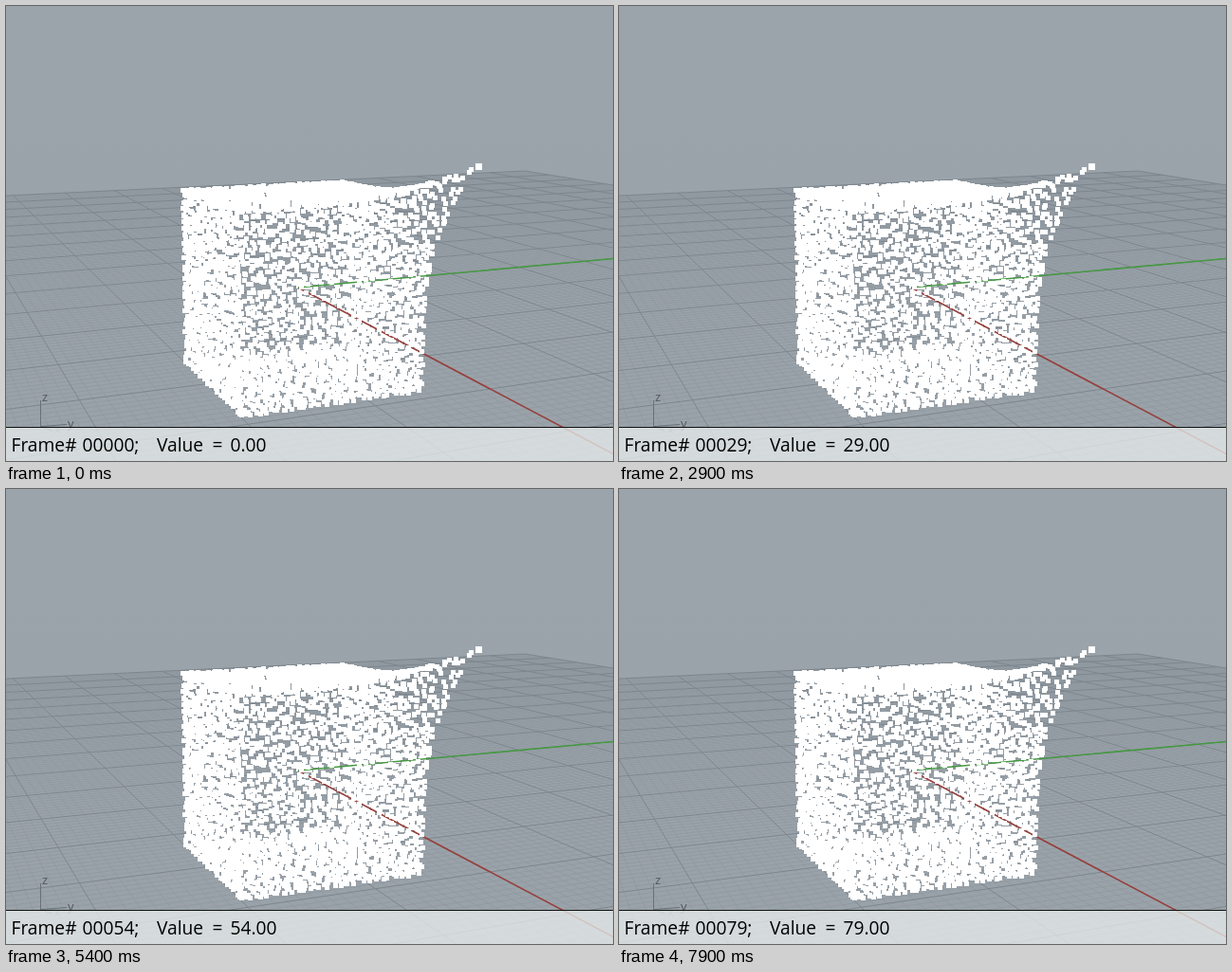
Write an HTML page that moves like this. It is 640 px wide and 480 px high and loops after 8000 ms.

```html
<!DOCTYPE html>
<html lang="en">
<head>
<meta charset="utf-8">
<style>
html, body { margin: 0; width: 100%; height: 100%; overflow: hidden; background: #9da4ab; }
svg { display: block; }
text { font: 19.2px "Open Sans", "Noto Sans", sans-serif; fill: #000; white-space: pre; }
.icon { font-size: 13px; fill: #51585e; }
</style>
</head>
<body>
<svg id="stage" width="640" height="480" viewBox="0 0 640 480" fill="none">
  <defs>
    <linearGradient id="sky" x2="0" y2="1">
      <stop stop-color="#9ca4ab"/>
      <stop offset="1" stop-color="#9aa2a9"/>
    </linearGradient>
  </defs>
  <rect width="640" height="480" fill="url(#sky)"/>
  <path id="minor" stroke="#9098a0" stroke-width=".8"/>
  <path id="major" stroke="#7d868d"/>
  <path id="far" fill="#fff" shape-rendering="crispEdges"/>
  <path id="axisX" stroke="#96413d" stroke-width="1.6"/>
  <path id="axisY" stroke="#459842" stroke-width="1.6"/>
  <path id="near" fill="#fff" shape-rendering="crispEdges"/>
  <path d="M36.5 416V443.500L64 441.500M36.500 443.500L48 448" stroke="#687178"/>
  <text class="icon" x="38" y="417">z</text>
  <text class="icon" x="65" y="445">y</text>
  <text class="icon" x="51" y="451" opacity=".5">x</text>
  <rect y="445" width="640" height="35" fill="#e8eded" fill-opacity=".76"/>
  <path d="M0 444.500H640" stroke="#111"/>
  <text x="5.500" y="470">Frame#</text>
  <text id="count" x="80.500" y="470"></text>
  <text x="159" y="470">Value</text>
  <text x="217.500" y="470">=</text>
  <text id="value" x="236.500" y="470"></text>
</svg>
<script>
const $ = id => document.getElementById(id);

// Perspective: origin plus three vanishing points; the grid spans -1..1.
const ORIGIN = [308, 297];
const AXES = [
  { k: -0.789, vp: [-131, 65] },
  { k: 0.339, vp: [2830, 65] },
  { k: -0.143, vp: [320, 6528] }
];

function project(...p) {
  let [x, y] = ORIGIN, w = 1;
  AXES.forEach(({ k, vp }, i) => {
    x += k * p[i] * vp[0];
    y += k * p[i] * vp[1];
    w += k * p[i];
  });
  return [x / w, y / w];
}

function line(a, b) {
  const at = p => project(...p).map(n => n.toFixed(1)).join(' ');
  return `M${at(a)}L${at(b)}`;
}

function drawGrid() {
  const paths = { minor: '', major: '' };
  for (let i = -100; i <= 100; i++) {
    const t = i / 100, kind = i % 10 ? 'minor' : 'major';
    // Stop each line before it passes behind the camera.
    const uMax = Math.min(1, (0.85 + 0.339 * t) / 0.789);
    const vMin = Math.max(-1, (0.789 * t - 0.85) / 0.339);
    paths[kind] += line([-1, t, 0], [uMax, t, 0]);
    if (vMin < 1) paths[kind] += line([t, vMin, 0], [t, 1, 0]);
  }
  for (const kind in paths) $(kind).setAttribute('d', paths[kind]);
  $('axisX').setAttribute('d', line([0, 0, 0], [1, 0, 0]));
  $('axisY').setAttribute('d', line([0, 0, 0], [0, 1, 0]));
}

let seed = 7;
function random() {
  seed = (seed * 16807) % 2147483647;
  return seed / 2147483647;
}

const HALF = 0.105;

function dot(p, size = 5) {
  const [x, y] = project(p[0] * HALF, p[1] * HALF, p[2] * HALF * 1.02);
  // The corner (1, 1, 1) is pulled outwards, fading with distance.
  const reach = Math.hypot(1 - p[0], 1 - p[1], 1 - p[2]) / 2;
  const pull = Math.exp(-reach / 0.18);
  const left = Math.round(x + 56 * pull - size / 2);
  const top = Math.round(y - 37 * pull - size / 2);
  return `M${left} ${top}h${size}v${size}h${-size}z`;
}

function face(axis, side) {
  const n = 25;
  let d = '';
  for (let i = 0; i < n; i++) {
    for (let j = 0; j < n; j++) {
      const spot = k => 2 * (k + 0.5 + (random() - 0.5) * 0.85) / n - 1;
      const p = [spot(i), spot(j)];
      p.splice(axis, 0, side);
      d += dot(p);
    }
  }
  return d;
}

function drawCube() {
  $('far').setAttribute('d', face(0, -1) + face(1, 1) + face(2, -1));
  $('near').setAttribute('d', face(0, 1) + face(1, -1) + face(2, 1) + dot([1, 1, 1], 7));
}

const start = performance.now();
function update() {
  const tick = Math.floor(((performance.now() - start) % 8000) / 100);
  $('count').textContent = String(tick).padStart(5, '0') + ';';
  $('value').textContent = tick.toFixed(2);
  requestAnimationFrame(update);
}

drawGrid();
drawCube();
update();
</script>
</body>
</html>
```
